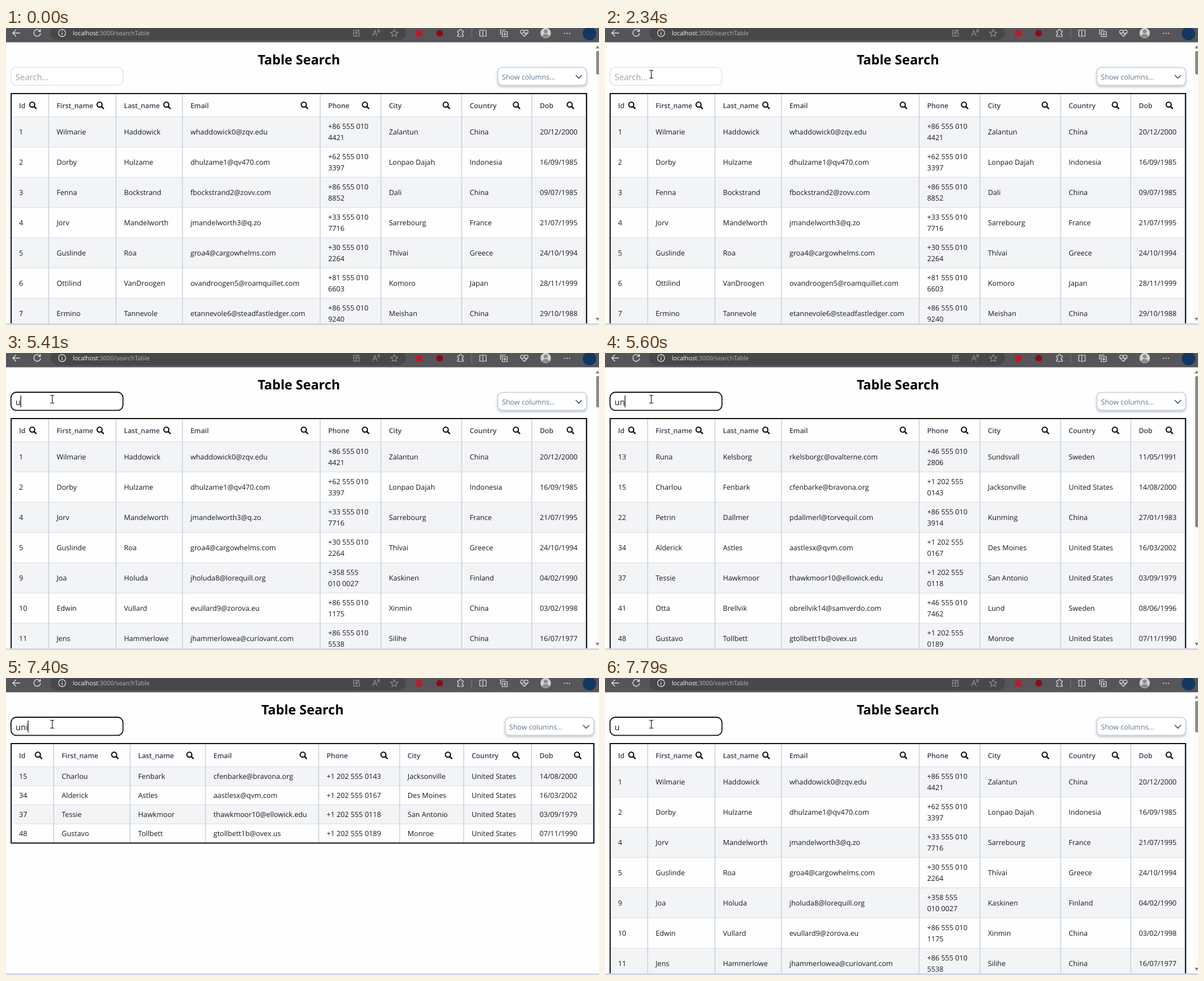
An HTML page that plays this animation: 1057x530 px, repeating every 7990 ms.

```html
<!DOCTYPE html>
<html lang="en">
<head>
<meta charset="utf-8">
<title>Table Search</title>
<style>
  html, body { margin: 0; width: 100%; height: 100%; overflow: hidden; background: #fff; }
  svg { display: block; width: 1057px; height: 530px; font-family: "Open Sans", "Noto Sans", sans-serif; text-rendering: geometricPrecision; }
  .cell { font-size: 12.7px; fill: #17191e; }
  .head { font-size: 12.35px; font-weight: 600; fill: #374151; }
  .title { font-size: 23.5px; font-weight: 700; text-anchor: middle; }
  .line { fill: none; stroke-linecap: round; stroke-linejoin: round; }
</style>
</head>
<body>
<svg id="stage" viewBox="0 0 1057 530" xmlns="http://www.w3.org/2000/svg"></svg>
<script>
const LOOP = 7990;

const PEOPLE = {
  1: 'Wilmarie|Haddowick|whaddowick0@zqv.edu|+86 555 010/4421|Zalantun|China|20/12/2000',
  2: 'Dorby|Hulzame|dhulzame1@qv470.com|+62 555 010/3397|Lonpao Dajah|Indonesia|16/09/1985',
  3: 'Fenna|Bockstrand|fbockstrand2@zovv.com|+86 555 010/8852|Dali|China|09/07/1985',
  4: 'Jorv|Mandelworth|jmandelworth3@q.zo|+33 555 010/7716|Sarrebourg|France|21/07/1995',
  5: 'Guslinde|Roa|groa4@cargowhelms.com|+30 555 010/2264|Thívai|Greece|24/10/1994',
  6: 'Ottilind|VanDroogen|ovandroogen5@roamquillet.com|+81 555 010/6603|Komoro|Japan|28/11/1999',
  7: 'Ermino|Tannevole|etannevole6@steadfastledger.com|+86 555 010/9240|Meishan|China|29/10/1988',
  9: 'Joa|Holuda|jholuda8@lorequill.org|+358 555/010 0027|Kaskinen|Finland|04/02/1990',
  10: 'Edwin|Vullard|evullard9@zorova.eu|+86 555 010/1175|Xinmin|China|03/02/1998',
  11: 'Jens|Hammerlowe|jhammerlowea@curiovant.com|+86 555 010/5538|Silihe|China|16/07/1977',
  13: 'Runa|Kelsborg|rkelsborgc@ovalterne.com|+46 555 010/2806|Sundsvall|Sweden|11/05/1991',
  15: 'Charlou|Fenbark|cfenbarke@bravona.org|+1 202 555/0143|Jacksonville|United States|14/08/2000',
  22: 'Petrin|Dallmer|pdallmerl@torvequil.com|+86 555 010/3914|Kunming|China|27/01/1983',
  34: 'Alderick|Astles|aastlesx@qvm.com|+1 202 555/0167|Des Moines|United States|16/03/2002',
  37: 'Tessie|Hawkmoor|thawkmoor10@ellowick.edu|+1 202 555/0118|San Antonio|United States|03/09/1979',
  41: 'Otta|Brellvik|obrellvik14@samverdo.com|+46 555 010/7462|Lund|Sweden|08/06/1996',
  48: 'Gustavo|Tollbett|gtollbett1b@ovex.us|+1 202 555/0189|Monroe|United States|07/11/1990'
};
const HEADS = ['Id', 'First_name', 'Last_name', 'Email', 'Phone', 'City', 'Country', 'Dob'];

const TALL = { edges: [9.5, 76, 196, 314.5, 560, 668.3, 812.3, 937.2, 1034], icons: [48, 168, 287, 532, 641, 785, 910, 1006], rowH: 54 };
const FLAT = { edges: [9.5, 85, 221.3, 355.6, 557.3, 701.6, 815.8, 936.7, 1047], icons: [58, 194, 328, 530, 674, 789, 909, 1019], rowH: 34 };

const VIEWS = {
  all: { ids: [1, 2, 3, 4, 5, 6, 7], grid: TALL, thumb: 42 },
  u: { ids: [1, 2, 4, 5, 9, 10, 11], grid: TALL, thumb: 56 },
  un: { ids: [13, 15, 22, 34, 37, 41, 48], grid: TALL, thumb: 270 },
  uni: { ids: [15, 34, 37, 48], grid: FLAT, thumb: 0 }
};

const TYPED = [[0, ''], [5410, 'u'], [5600, 'un'], [5800, 'uni'], [5870, 'unit'], [5930, 'unite'], [6130, 'united'],
  [7050, 'unite'], [7260, 'unit'], [7400, 'uni'], [7590, 'un'], [7790, 'u']];
const CARET = [[0, false], [4150, true], [4660, false], [5200, true], [6670, false], [7190, true], [7790, false]];
// Time, x, y: the arrow's tip or the beam's centre
const POINTER = [[140, 862, 376], [200, 672, 296], [260, 473, 211],
  [450, 412, 160], [516, 322, 108], [581, 228, 66], [647, 142, 45], [713, 78, 56], [779, 44, 72], [844, 58, 76], [910, 73, 75.5],
  [1110, 74.5, 77], [1180, 76, 78.5], [1250, 78, 80], [1320, 79.5, 81], [1390, 80, 81.5], [2250, 81, 82], [2340, 82.5, 82.5]];

const text = (x, y, str, cls) => `<text x="${x}" y="${y}" class="${cls}">${str}</text>`;
const box = (x, y, w, h, fill, extra = '') => `<rect x="${x}" y="${y}" width="${w}" height="${h}" fill="${fill}" ${extra}/>`;
const line = (d, stroke, width) => `<path class="line" d="${d}" stroke="${stroke}" stroke-width="${width}"/>`;
const disc = (x, y, r, fill, extra = '') => `<circle cx="${x}" cy="${y}" r="${r}" fill="${fill}" ${extra}/>`;
const lens = (x, y) => disc(x - 1.2, y - 1.2, 4.5, 'none', 'stroke="#000" stroke-width="2"') +
  line(`M${x + 2.4} ${y + 2.4}L${x + 5.7} ${y + 5.7}`, '#000', 2.3);

function toolbar() {
  const dim = '#98989b', lit = '#e6e6e6';
  const ring = `stroke="${lit}" stroke-width="1.2"`;
  return box(0, 0, 1057, 25.5, '#56565a') + box(79, -5, 634, 27, '#48484b', 'rx="13.5"') +
    line('M24.5 9H12M17.5 3.5L12 9L17.5 14.5', lit, 1.3) +
    line('M60.5 5.2A6 6 0 1 0 61.5 10M61.3 2.5V6H57.6', lit, 1.3) +
    disc(100, 9, 6.3, 'none', ring) + line('M100 8.5V12M100 6V6.1', lit, 1.3) +
    `<text x="119" y="13.3" font-size="10.85" fill="#f6f6f6">localhost<tspan fill="#b4b4b6">:3000/searchTable</tspan></text>` +
    line('M619.5 4H624.5V9H619.5ZM619.5 9V14.5H630V9H624.5V14.5M628 2.5V7.5M625.5 5H630.5', dim, 1.1) +
    line('M653.5 14L657.5 4L661.5 14M655 10.5H660M662.5 3Q664.5 5 662.5 7M664.5 2Q667 5 664.5 8', dim, 1.1) +
    line('M692 2.8L693.9 7L698.5 7.5L695 10.5L696 15L692 12.7L688 15L689 10.5L685.5 7.5L690.1 7Z', dim, 1.1) +
    box(731, 4, 11, 11, '#c01828') + disc(773, 9.3, 6, '#8c0c16') +
    line('M805 5H808.3A2 2 0 1 1 812 5H815V8A2 2 0 1 0 815 12V15H805V12A2 2 0 1 0 805 8Z', lit, 1.2) +
    line('M830 2V17', '#7c7c80', 1) +
    line('M848 4H844.5V14.5H848M852 4H855.8V14.5H852M850 2.5V16', lit, 1.2) +
    line('M881.5 11.5V3.5H890M884.5 6.5H893.5V15.5H884.5ZM889 8.5V13.5M886.5 11H891.5', lit, 1.2) +
    line('M924 15L918 9C915.5 4.5 921 1.5 924 5.5C927 1.5 932.5 4.5 930 9ZM917.5 9H922L923.5 6.5L925.5 11L926.5 9H930', lit, 1.2) +
    disc(962, 9, 9.3, '#d0d0d0') + disc(962, 6.2, 3.4, '#8b8b8b') +
    '<path d="M955.8 15.5Q956 10.8 962 10.8T968.2 15.5Q962 20 955.8 15.5Z" fill="#8b8b8b"/>' +
    [995.5, 1000, 1004.5].map(x => disc(x, 9.5, 1.1, lit)).join('') +
    disc(1040, 10, 12, '#12385f');
}

function table({ ids, grid }) {
  const { edges, icons, rowH } = grid;
  const left = edges[0], right = edges[8], width = right - left;
  const tall = rowH > 40;
  const bottom = 158.5 + rowH * ids.length;
  const startX = i => i ? edges[i] + 14.2 : 23.3;
  let out = '';
  ids.forEach((id, r) => {
    const y = 158 + r * rowH, base = y + rowH / 2 + 5;
    if (r % 2 === 0) out += box(left, y, width, rowH, '#f3f4f6');
    out += line(`M${left} ${y + 0.3}H${right}`, '#d9dde3', 1);
    [String(id), ...PEOPLE[id].split('|')].forEach((value, c) => {
      const x = startX(c);
      const parts = value.split('/');
      if (c !== 4) out += text(x, base, value, 'cell');
      else if (tall) out += text(x, base - 10, parts[0], 'cell') + text(x, base + 10, parts[1], 'cell');
      else out += text(x, base, parts.join(' '), 'cell');
    });
  });
  HEADS.forEach((name, c) => { out += text(startX(c), 143.2, name, 'head') + lens(icons[c], 138); });
  edges.slice(1).forEach((x, i) => { out += line(`M${i === 7 ? x - 0.7 : x} 118V${bottom}`, '#cbd5e1', 1.7); });
  return out + box(left - 0.3, 117, width + 1.2, bottom - 117, 'none', 'stroke="#000" stroke-width="1.9"');
}

// Title and column picker, shifted with the page width
function heading(wide) {
  const dx = wide ? 13 : 0;
  return text(wide ? 528.5 : 522, 65, 'Table Search', 'title') +
    `<g transform="translate(${dx})">` +
    box(876.7, 70.3, 158.2, 31.9, '#fff', 'rx="8" stroke="#cbd5e1" stroke-width="1.8" filter="url(#soft)"') +
    `<text x="884" y="91.6" font-size="12.55" fill="#64748b">Show columns...</text>` +
    line('M1016 84.5L1021 89.7L1026 84.5', '#475569', 1.7) + '</g>';
}

const scrollbar = size => box(1050, 25.5, 7, 502, '#fbfbfb') +
  '<path d="M1051 36.5L1054.5 31L1058 36.5ZM1051 517L1054.5 522.5L1058 517Z" fill="#858585"/>' +
  box(1052, 41, 9, size, '#8a8a8a', 'rx="3"');

const view = key => {
  const v = VIEWS[key], wide = v.grid === FLAT;
  return `<g id="view-${key}">${heading(wide)}${table(v)}${wide ? '' : scrollbar(v.thumb)}</g>`;
};

const stage = document.getElementById('stage');
stage.innerHTML =
  '<defs><filter id="soft" x="-10%" y="-30%" width="120%" height="180%"><feDropShadow dx="0" dy="2.5" stdDeviation="2.2" flood-color="#64748b" flood-opacity=".4"/></filter></defs>' +
  box(0, 0, 1057, 530, '#fefefe') + Object.keys(VIEWS).map(view).join('') + toolbar() +
  box(0, 527, 1057, 3, '#cfd8e6') +
  box(8.9, 70, 199.6, 32.3, '#fff', 'id="field" rx="9.5"') +
  '<text id="query" x="17" y="92.7" font-size="15"></text>' +
  box(0, 76, 1.2, 21, '#000', 'id="caret"') +
  disc(82.5, 83, 10.8, '#fbf53c', 'id="click" opacity=".8"') +
  '<path id="arrow" d="M0 0V14.5L3.4 11.4L5.7 16.3L8 15.2L5.8 10.5H10.5Z" fill="#fff" stroke="#000" stroke-width=".9"/>' +
  '<g id="beam">' + line('M-3.2 -7H-1.2L0 -6.2L1.2 -7H3.2M0 -6.2V6.2M-3.2 7H-1.2L0 6.2L1.2 7H3.2', '#111', 1.1) + '</g>';

const $ = id => document.getElementById(id);
const show = (id, on) => $(id).setAttribute('display', on ? 'inline' : 'none');
const latest = (steps, t) => steps.filter(s => s[0] <= t).pop();

function draw(t) {
  const typed = latest(TYPED, t)[1];
  const current = typed.slice(0, 3) || 'all';
  Object.keys(VIEWS).forEach(key => show('view-' + key, key === current));

  const focused = t >= 4150;
  $('field').setAttribute('stroke', focused ? '#111' : '#e1e4e8');
  $('field').setAttribute('stroke-width', focused ? 1.8 : 1.6);

  const query = $('query');
  query.textContent = typed || 'Search...';
  query.setAttribute('fill', typed ? '#17191e' : '#9ca3af');
  $('caret').setAttribute('x', 16.6 + (typed ? query.getComputedTextLength() : 0));
  show('caret', latest(CARET, t)[1]);
  show('click', t >= 4070 && t < 4210);

  const spot = latest(POINTER, t);
  const inField = spot && spot[1] < 208 && spot[2] > 70 && spot[2] < 102;
  show('beam', inField);
  show('arrow', spot && !inField);
  if (spot) $(inField ? 'beam' : 'arrow').setAttribute('transform', `translate(${spot[1]} ${spot[2]})`);
}

const start = performance.now();
function tick() {
  draw((performance.now() - start) % LOOP);
  requestAnimationFrame(tick);
}
tick();
</script>
</body>
</html>
```
